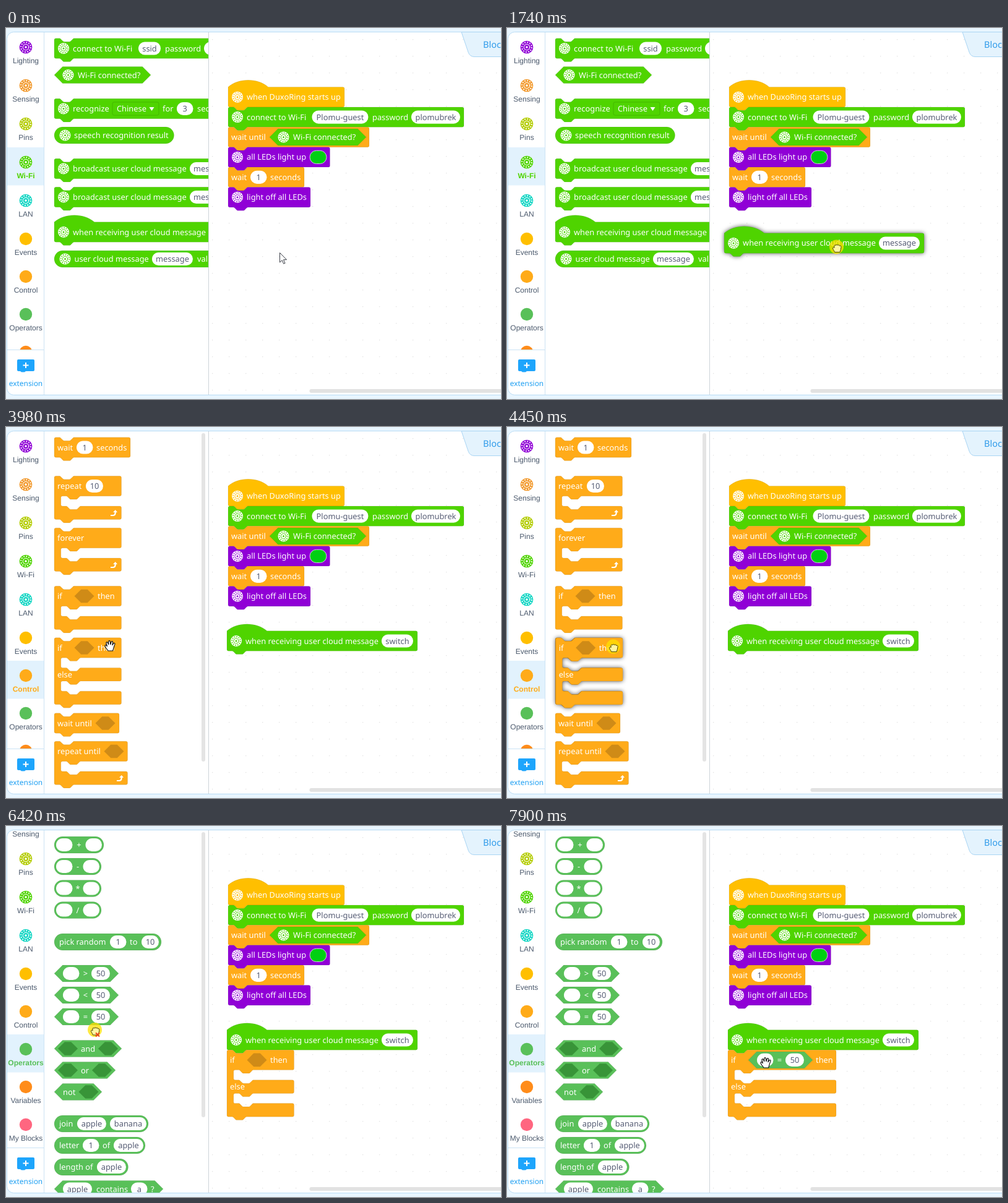
An HTML page for the animation above (7990 ms loop, 800 by 600 pixels).

```html
<!DOCTYPE html>
<html lang="en">
<head>
<meta charset="utf-8">
<title>Block editor</title>
<style>
  html, body { margin: 0; width: 100%; height: 100%; overflow: hidden; background: #e8f5fe; }
  svg { display: block; width: 800px; height: 600px; }
  text { font: 12.85px 'Noto Sans', 'Open Sans', sans-serif; text-rendering: geometricPrecision; white-space: pre; }
  .label { font: 12px 'Liberation Sans', Arial, sans-serif; text-anchor: middle; }
  .chosen { font-weight: bold; }
  .mid { text-anchor: middle; }
  .lifted { filter: drop-shadow(0 0 3.5px rgba(0, 0, 0, .65)); }
</style>
</head>
<body>
<svg viewBox="0 0 800 600">
  <defs>
    <clipPath id="sideClip"><rect x="2" y="7" width="59" height="513"/></clipPath>
    <clipPath id="shelfClip"><rect x="62" y="7" width="265" height="586"/></clipPath>
    <pattern id="dots" x="333" y="18" width="27" height="27" patternUnits="userSpaceOnUse">
      <rect width="1.3" height="1.3" fill="#e2e2e2"/>
    </pattern>
  </defs>
  <rect x="1.5" y="6.5" width="830" height="587" rx="11" fill="#fff" stroke="#b9dcf5"/>
  <rect x="328" y="7" width="472" height="586" fill="url(#dots)"/>
  <path d="M736 6.5L747 39Q749.500 46.500 757 46.500H801V6.500Z" fill="#e4f3fd" stroke="#a9d5f4"/>
  <text x="771" y="32" fill="#2f9bea" style="font-size:14.5px">Blocks</text>
  <rect x="490.500" y="584" width="330" height="6" rx="3" fill="#e2e2e2"/>
  <g id="stack"></g>
  <g id="work"></g>
  <g id="shelf" clip-path="url(#shelfClip)"></g>
  <path d="M327.500 7V593" stroke="#cdd3d9"/>
  <path d="M61.500 7V593" stroke="#cbe2f4"/>
  <g id="side" clip-path="url(#sideClip)"></g>
  <path d="M2 520.500H61" stroke="#cbe2f4"/>
  <path d="M20 536H44Q46 536 46 538V553Q46 555 44 555H32L30 556.500H25L23 555H20Q18 555 18 553V538Q18 536 20 536Z" fill="#1ea5fc"/>
  <path d="M27.500 545.500H36.500M32 541V550" stroke="#fff" stroke-width="2"/>
  <text class="mid" x="32" y="579" fill="#1e9ff2" style="font-size:11.9px">extension</text>
  <g id="drag" class="lifted"></g>
  <g id="cursor"></g>
</svg>
<script>
const LOOP = 7990;
const UNIT = 0.675;
const GREEN = '#4fd400', PURPLE = '#9000d6', EVENT = '#ffbf00', CONTROL = '#ffab19', OPERATOR = '#59c059';
const SLOT = { [CONTROL]: '#cf8b17', [OPERATOR]: '#389438' };
const INK = '#575e75';

// Block outlines, in block units
const NOTCH = 'c2 0 3 1 4 2l4 4c1 1 2 2 4 2h12c2 0 3-1 4-2l4-4c1-1 2-2 4-2';
const NOTCH_BACK = 'c-2 0-3 1-4 2l-4 4c-1 1-2 2-4 2h-12c-2 0-3-1-4-2l-4-4c-1-1-2-2-4-2';

function outline(width, hat, mouths) {
  const right = width / UNIT - 4;
  const top = hat ? 'M0 0c25-22 71-22 96 0' : `M0 4a4 4 0 0 1 4-4h8${NOTCH}`;
  const edge = `H${right}a4 4 0 0 1 4 4`;
  const mouth = `H64${NOTCH_BACK}h-8a4 4 0 0 0-4 4v16a4 4 0 0 0 4 4h8${NOTCH}${edge}v24a4 4 0 0 1-4 4`;
  return `${top}${edge}v40a4 4 0 0 1-4 4${mouth.repeat(mouths)}H48${NOTCH_BACK}H4a4 4 0 0 1-4-4z`;
}

// Every block is placed by its left edge and the middle of its first text line
const at = (x, y, kids) => `<g transform="translate(${x} ${y})">${kids}</g>`;
const edged = color => `fill="${color}" stroke="#000" stroke-opacity=".12"`;

const block = (x, y, width, color, kids, { hat = false, mouths = 0 } = {}) => at(x, y,
  `<path transform="translate(0 -16.2) scale(${UNIT})" d="${outline(width, hat, mouths)}" ${edged(color)}/>${kids}`);
const pill = (x, y, width, color, kids) => at(x, y,
  `<rect y="-13.5" width="${width}" height="27" rx="13.5" ${edged(color)} stroke-width=".7"/>${kids}`);
const hexagon = (x, width, height, fill) => {
  const h = height / 2;
  return `<path d="M${x} 0l${h} ${-h}h${width - height}l${h} ${h}l${-h} ${h}h${height - width}z" ${fill}/>`;
};
const bool = (x, y, width, color, kids) => at(x, y, hexagon(0, width, 27, edged(color) + ' stroke-width=".7"') + kids);
const slot = (x, color) => hexagon(x, 32, 21.6, `fill="${SLOT[color]}"`);

const text = (x, words, y = 0) => `<text x="${x}" y="${y + 4.5}" fill="#fff">${words}</text>`;
const field = (x, width, words = '') =>
  `<rect x="${x}" y="-10.6" width="${width}" height="21.2" rx="10.6" fill="#fff"/>` +
  `<text class="mid" x="${x + width / 2}" y="4.5" fill="${INK}">${words}</text>`;
const dottedDisc = (x, y, disc, ink, scale = 1) => `<g transform="translate(${x} ${y}) scale(${scale})" fill="none" stroke="${ink}">
  <circle r="9" fill="${disc}" stroke="none"/>
  <circle r="6.9" stroke-width="1.6" stroke-dasharray="1.7 1.913"/>
  <circle r="4.1" stroke-width="1.3" stroke-dasharray="1.500 .647"/>
  <circle r="1.5" fill="${ink}" stroke="none"/></g>`;
const icon = (x, color) => dottedDisc(x, 0, '#fff', color);
const turn = (x, y) => `<path transform="translate(${x} ${y})" fill="#fff"
  d="M-5 3H-1.500Q1.500 3 1.500-.5V-1H-1L2.800-5 6-1H3.800V0Q3.800 5-1.500 5H-5Z"/>`;

const wifiTest = (x, y) => bool(x, y, 156, GREEN, icon(22.5, GREEN) + text(38, 'Wi-Fi connected?'));
const waitOne = (x, y) => block(x, y, 123, CONTROL, text(5, 'wait') + field(36, 26.5, '1') + text(68, 'seconds'));
const receiver = (x, y, word, width, editing = false) => block(x, y, 257 + width, GREEN,
  icon(15, GREEN) + text(30, 'when receiving user cloud message') +
  (editing ? `<rect x="248" y="-12.600" width="${width + 4}" height="25.2" rx="12.6" fill="#fff" opacity=".4"/>` : '') +
  field(250, width, word), { hat: true });
const equals = (x, y) => compare(x, y, '=');
const compare = (x, y, sign) => bool(x, y, 104, OPERATOR,
  field(14, 26.5) + `<text class="mid" x="50.5" y="4.5" fill="#fff">${sign}</text>` + field(60, 30, '50'));
const ifElse = (x, y, filled = false) => block(x, y, filled ? 175 : 108.5, CONTROL,
  text(5, 'if') + (filled ? equals(33, 0) : slot(32.5, CONTROL)) + text(filled ? 142 : 70, 'then') + text(5, 'else', 43.5),
  { mouths: 2 });

const shelves = {
  wifi() {
    const broadcast = y => block(78, y, 300, GREEN, icon(15, GREEN) + text(30, 'broadcast user cloud message') + field(219, 66, 'message'));
    return block(78, 33, 340, GREEN, icon(15, GREEN) + text(30, 'connect to Wi-Fi') + field(136, 36, 'ssid') + text(179, 'password') + field(242, 70)) +
      wifiTest(78, 76) +
      block(78, 130.5, 290, GREEN, icon(15, GREEN) + text(30, 'recognize') +
        '<rect x="94" y="-10.6" width="75" height="21.2" rx="2.7" fill="none" stroke="#43b700"/>' +
        text(101, 'Chinese') + '<path d="M153.500-2.500h8l-4 6z" fill="#fff"/>' + text(175, 'for') + field(198, 26.5, '3') + text(231, 'secs')) +
      pill(78, 173.5, 193.5, GREEN, icon(17.5, GREEN) + text(32, 'speech recognition result')) +
      broadcast(227.5) + broadcast(273.5) + receiver(78, 330, 'message', 66) +
      pill(78, 373.5, 290, GREEN, icon(17.5, GREEN) + text(32.5, 'user cloud message') + field(158, 66, 'message') + text(231, 'value'));
  },
  control() {
    const loop = (y, width, kids, arrow = true) => block(78, y, width, CONTROL,
      kids + (arrow ? turn(width - 12.5, 43.5) : ''), { mouths: 1 });
    return waitOne(78, 33) +
      loop(95.5, 108.5, text(5, 'repeat') + field(51, 28, '10')) +
      loop(179.5, 108.5, text(5, 'forever')) +
      loop(273.5, 108.5, text(5, 'if') + slot(32.5, CONTROL) + text(70, 'then'), false) +
      ifElse(78, 357) +
      block(78, 479, 105, CONTROL, text(5, 'wait until') + slot(66.5, CONTROL)) +
      loop(524.5, 118.5, text(5, 'repeat until') + slot(80.5, CONTROL)) + scrollbar(531);
  },
  operators() {
    const sum = (y, width, sign) => pill(78, y, width, OPERATOR,
      field(3, 26.5) + `<text class="mid" x="${width / 2}" y="4.5" fill="#fff">${sign}</text>` + field(width - 29.5, 26.5));
    const logic = (y, width, word) => bool(78, y, width, OPERATOR, slot(6, OPERATOR) + text(43, word) + slot(width - 38, OPERATOR));
    return sum(30.5, 80, '+') + sum(65.5, 76, '-') + sum(101, 76, '*') + sum(136, 76, '/') +
      pill(78, 187.5, 173, OPERATOR, text(8, 'pick random') + field(90, 26.5, '1') + text(122, 'to') + field(141, 28, '10')) +
      compare(78, 238.5, '&gt;') + compare(78, 273.5, '&lt;') + equals(78, 308.5) +
      logic(360, 109, 'and') + logic(395, 99, 'or') +
      bool(78, 430, 77, OPERATOR, text(14, 'not') + slot(39.5, OPERATOR)) +
      pill(78, 481.5, 152, OPERATOR, text(8, 'join') + field(37, 47, 'apple') + field(90, 59, 'banana')) +
      pill(78, 516.5, 147, OPERATOR, text(8, 'letter') + field(46, 26.5, '1') + text(78, 'of') + field(96, 48, 'apple')) +
      pill(78, 551.5, 119.5, OPERATOR, text(8, 'length of') + field(69, 47, 'apple')) +
      bool(78, 587, 176, OPERATOR, field(14, 47, 'apple') + text(68, 'contains') + field(124, 26.5, 'a') + text(156, '?')) +
      scrollbar(461);
  }
};
const scrollbar = height => `<rect x="316" y="10" width="6" height="${height}" rx="3" fill="#e4e4e4"/>`;

const startStack = () =>
  block(359, 111.7, 188, EVENT, icon(15, EVENT) + text(30, 'when DuxoRing starts up'), { hat: true }) +
  block(359, 144.1, 381, GREEN, icon(15, GREEN) + text(30, 'connect to Wi-Fi') + field(135.5, 91, 'Plomu-guest') +
    text(233, 'password') + field(296, 79, 'plomubrek')) +
  block(359, 176.5, 228, CONTROL, text(5, 'wait until') + wifiTest(67, 0)) +
  block(359, 208.9, 164.5, PURPLE, icon(15, PURPLE) + text(30, 'all LEDs light up') +
    '<rect x="132" y="-10.6" width="27" height="21.2" rx="10.6" fill="#00d012" stroke="#d9c4ee"/>') +
  waitOne(359, 241.3) +
  block(359, 273.7, 133, PURPLE, icon(15, PURPLE) + text(30, 'light off all LEDs'));

const categories = [
  ['Lighting', PURPLE], ['Sensing', '#f29a2e'], ['Pins', '#b3cc00'], ['Wi-Fi', GREEN], ['LAN', '#14d6c4'],
  ['Events', EVENT], ['Control', '#ffab19'], ['Operators', OPERATOR], ['Variables', '#ff8c1a'], ['My Blocks', '#ff6680']
];
const sidebar = (chosen, scroll) => at(0, -scroll, categories.map(([name, color], i) => {
  const y = i < 6 ? 31 + 62 * i : 341 + 61 * (i - 5);
  const on = name === chosen;
  return (on ? `<rect x="2" y="${y - 24}" width="59" height="61.5" fill="#e2f2fd"/>` : '') +
    (i < 5 ? dottedDisc(32, y, color, '#fff', 1.15) : `<circle cx="32" cy="${y}" r="10.2" fill="${color}"/>`) +
    `<text class="label${on ? ' chosen' : ''}" x="32" y="${y + 25.7}" fill="${on ? color : '#4d5b6e'}">${name}</text>`;
}).join(''));

// Pointer: time, x, y and, where it changes, the shape
const path = [
  [0, 442, 363, 'arrow'], [80, 442, 363], [170, 455, 374], [430, 380, 352], [640, 300, 338, 'hand'], [820, 259.5, 336],
  [890, 259.5, 336, 'grab'], [985, 350, 338], [1080, 455.5, 341.5], [1240, 492, 347], [1650, 527, 352.5], [1740, 532.5, 354],
  [1840, 538.5, 352], [2030, 538.5, 352, 'hand'], [2140, 570, 350, 'arrow'], [2300, 630, 347], [2600, 640, 350],
  [2770, 667, 373], [2860, 684, 398], [3050, 684, 391, 'click'], [3130, 684, 391, 'arrow'], [3430, 684, 391],
  [3430, 36, 405], [3600, 36, 405], [3720, 90, 385, 'hand'], [3980, 168, 354], [4370, 171, 355],
  [4450, 171, 355, 'grab'], [4640, 290, 372], [4920, 430, 383], [5200, 450, 376, 'hand'], [5300, 480, 386, 'arrow'],
  [5390, 505, 394], [5680, 505, 394], [5680, 36, 400], [5850, 36, 365], [6000, 62, 352], [6240, 122, 314, 'hand'],
  [6330, 129, 312], [6420, 143.5, 329.5, 'delete'], [6640, 150, 336], [6710, 165, 342], [6840, 303, 373, 'grab'],
  [6970, 441, 404], [7170, 442, 398], [7340, 441, 382], [7530, 441, 382, 'hand'], [7720, 431, 382], [7900, 418, 383], [LOOP, 418, 383]
];
path.forEach((key, i) => { key[3] ||= path[i - 1][3]; });

function pointer(t) {
  const next = path.findIndex(key => key[0] > t);
  const [t0, x0, y0, shape] = path[next - 1];
  const [t1, x1, y1] = path[next];
  const p = (t - t0) / (t1 - t0);
  return { x: x0 + (x1 - x0) * p, y: y0 + (y1 - y0) * p, shape };
}

const arrow = '<path d="M.5.500V16L4.200 12.500 6.700 18.300 9 17.300 6.500 11.700H11.500Z" fill="#fff" stroke="#3c4048"/>';
const open = `<path d="M-3 8C-5 5-8 2-8 0-8-2-6-2-4.500 1L-6-4C-6.500-6.500-4-7-3.200-4.500L-2.300-2V-6.500C-2.300-9 .3-9 .5-6.500L.8-2 2-6
  C2.600-8.300 5-7.600 4.600-5.300L3.800-1 5.600-3.800C6.800-5.600 8.600-4.400 7.800-2.400 6 2 6 4 4.500 8Z" fill="#fff" stroke="#111" stroke-width="1.2"/>`;
const closed = `<path transform="translate(1 1.5)" d="M-4 7C-5 4-7.500 2-7 0-6.600-1.200-5-.6-4.500 0L-4.600-3C-4.400-5-2.400-5-2-3.600-1.800-5.600 1-5.600 1.200-3.800
  1.600-5.200 4-5 4-3 5.600-4 6.800-2.600 6.400-1 6 2 5.500 4 4.500 7Z" fill="#fff6a0" stroke="#4a4400"/>`;
const glow = '<circle r="11.5" fill="#ffe000" opacity=".75"/>';
const cross = '<path d="M1.500 5l6 6m0-6l-6 6" stroke="#e8431c" stroke-width="2"/>';
const shapes = { arrow, hand: open, grab: glow + closed, click: glow + arrow, delete: glow + closed + cross };

const shown = {};
function put(id, html) {
  if (shown[id] === html) return;
  shown[id] = html;
  document.getElementById(id).innerHTML = html;
}

const shelfCache = Object.fromEntries(Object.entries(shelves).map(([name, build]) => [name, build()]));
const within = (t, from, to) => t >= from && t < to;

function workspace(t) {
  if (t < 2030) return '';
  const word = t < 2400 ? 'message' : 'switch'.slice(0, Math.floor((t - 2400) / 62) + 1);
  const width = word === 'message' ? 66 : Math.max(27, 15 + 6 * word.length);
  let html = receiver(357, 346, word, width, within(t, 2300, 3050));
  if (within(t, 4750, 5200)) html += block(357, 378.4, 108.5, '#c5c5c5', '', { mouths: 2 });
  if (t >= 5200) html += ifElse(357, 378.4, t >= 7530);
  return html;
}

function dragged(t, { x, y }) {
  if (within(t, 890, 2030)) return receiver(x - 181.5, y - 6, 'message', 66);
  if (within(t, 4450, 5200)) return ifElse(x - 93, y + 2);
  if (within(t, 6500, 7530)) return equals(x - 51, y - 3.5);
  return '';
}

function draw(now) {
  const t = now % LOOP;
  const spot = pointer(t);
  const [shelf, chosen] = t < 3430 ? ['wifi', 'Wi-Fi'] : t < 5850 ? ['control', 'Control'] : ['operators', 'Operators'];
  put('side', sidebar(chosen, t < 5680 ? 0 : 102));
  put('shelf', shelfCache[shelf]);
  put('work', workspace(t));
  put('drag', dragged(t, spot));
  put('cursor', at(spot.x, spot.y, shapes[spot.shape]));
  requestAnimationFrame(draw);
}

put('stack', startStack());
const begin = performance.now();
requestAnimationFrame(function first() { draw(0); });
const tick = draw;
draw = now => tick(Math.max(0, now - begin));
</script>
</body>
</html>
```
